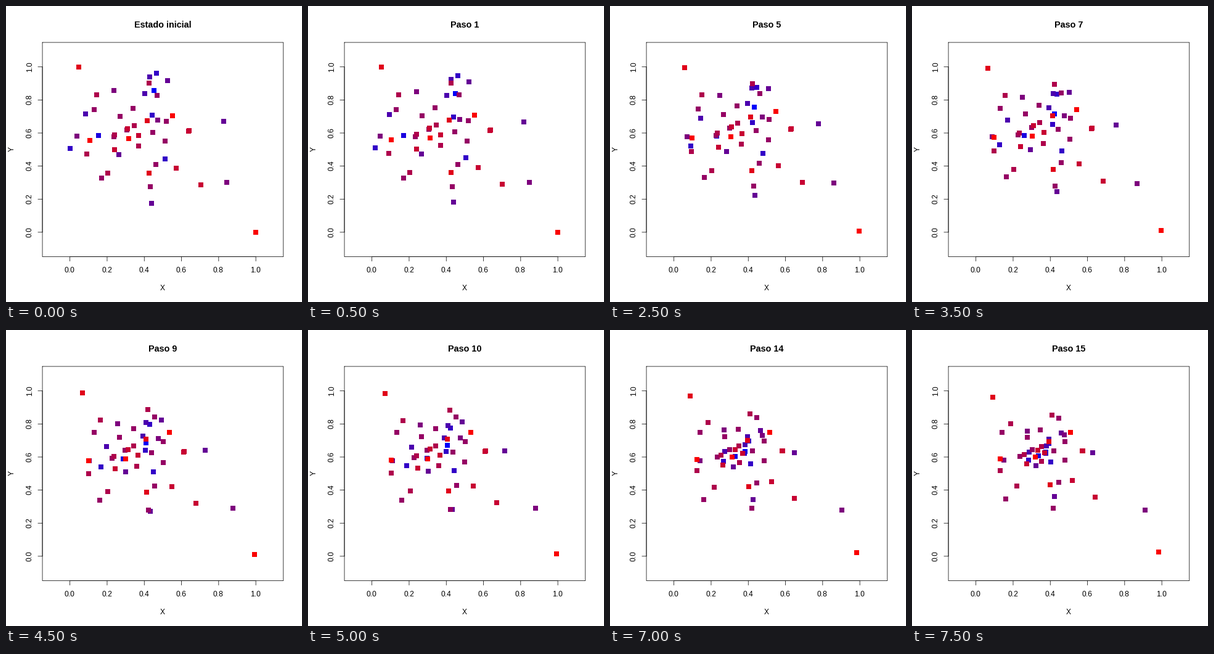
A matplotlib script that plays this animation: 480x480 px, repeating every 8 s.

```python
import numpy as np
import matplotlib.pyplot as plt
from matplotlib.animation import FuncAnimation
from matplotlib.patches import Rectangle

SIZE, DPI = 480, 100
PT = 72 / DPI
STEPS = 16
MAX_MOVE = 0.02
SIDE = 8

# Plot box and the pixel scale of the unit square
LEFT, RIGHT, TOP, BOTTOM = 59.04, 449.76, 59.04, 406.56
ORIGIN = np.array([103.66, 366.87])
UNIT = np.array([301.48, -268.15])

# Starting pixels of the particles, by electric charge
PARTICLES = {
    -1: [(240, 137)],
    -0.8: [(150, 210)],
    -0.6: [(237, 177), (244, 109), (104, 231), (258, 248)],
    -0.4: [(129, 175), (225, 142), (233, 115)],
    -0.2: [(183, 241), (236, 320), (353, 187), (262, 121)],
    -0.05: [(115, 211), (175, 137)],
    0.05: [(358, 286), (246, 185)],
    0.2: [(143, 168), (155, 279), (185, 179), (175, 212), (206, 166),
          (196, 201), (260, 187), (238, 205), (258, 219), (243, 257),
          (234, 293), (245, 145)],
    0.4: [(147, 144), (131, 240), (165, 271), (176, 209), (208, 194),
          (215, 227), (232, 125)],
    0.6: [(176, 233), (197, 199), (215, 210), (276, 263), (316, 290),
          (296, 203), (297, 202)],
    0.8: [(118, 99), (229, 186), (232, 271)],
    1: [(136, 218), (405, 367), (270, 178), (199, 215)],
}


def to_pixels(pos):
    return ORIGIN + UNIT * pos


def forces(pos, charge):
    """Opposite charges attract, like charges repel, by charge difference."""
    gap = pos[None] - pos[:, None]
    dist = np.hypot(gap[..., 0], gap[..., 1]) + 0.001
    ci, cj = charge[:, None], charge[None]
    pull = np.where(ci * cj < 0, 1, -1) * abs(ci - cj) / dist
    return (pull[..., None] * gap).sum(axis=1)


def simulate(pos, charge):
    """Each step, the strongest force component moves by MAX_MOVE."""
    path = [pos]
    for _ in range(STEPS - 1):
        f = forces(pos, charge)
        pos = np.clip(pos + MAX_MOVE * f / abs(f).max(), 0, 1)
        path.append(pos)
    return path


def charge_color(c):
    level = round(5 * c) + 5
    return (25 * level / 256, 0, 25 * (10 - level) / 256)


charges = np.array([c for c, group in PARTICLES.items() for _ in group])
start = np.array([p for group in PARTICLES.values() for p in group])
path = simulate(np.clip((start - ORIGIN) / UNIT, 0, 1), charges)

fig = plt.figure(figsize=(SIZE / DPI, SIZE / DPI), dpi=DPI, facecolor="white")
ax = fig.add_axes([0, 0, 1, 1])
ax.set_xlim(0, SIZE)
ax.set_ylim(SIZE, 0)
ax.axis("off")


def line(xs, ys):
    ax.plot(xs, ys, color="black", lw=0.75 * PT, snap=False,
            solid_capstyle="round", solid_joinstyle="round")


def label(x, y, s, size=12, **kw):
    return ax.text(x, y, s, fontsize=size * PT, family="Liberation Sans",
                   ha="center", va="baseline", rotation_mode="anchor", **kw)


line([LEFT, RIGHT, RIGHT, LEFT, LEFT], [TOP, TOP, BOTTOM, BOTTOM, TOP])
(x0, y0), (x1, y1) = to_pixels(np.array([[0, 0], [1, 1]]))
line([x0, x1], [BOTTOM, BOTTOM])
line([LEFT, LEFT], [y0, y1])
for v in np.arange(6) / 5:
    x, y = to_pixels(v)
    line([x, x], [BOTTOM, BOTTOM + 7.2])
    line([LEFT, LEFT - 7.2], [y, y])
    label(x - 0.5, 432, f"{v:.1f}")
    label(42, y - 0.6, f"{v:.1f}", rotation=90)
label(253.9, 461, "X")
label(13, 232.2, "Y", rotation=90)
title = label(254, 35, "", 14.4, weight="bold")

squares = [ax.add_patch(Rectangle((0, 0), SIDE, SIDE, lw=0, antialiased=False,
                                  facecolor=charge_color(c), zorder=3))
           for c in charges]


def draw(step):
    title.set_text(f"Paso {step}" if step else "Estado inicial")
    for square, centre in zip(squares, np.round(to_pixels(path[step]))):
        square.set_xy(centre - SIDE / 2)
    return [title, *squares]


anim = FuncAnimation(fig, draw, frames=STEPS, interval=500,
                     repeat=True, repeat_delay=0, blit=False)
plt.show()
```
